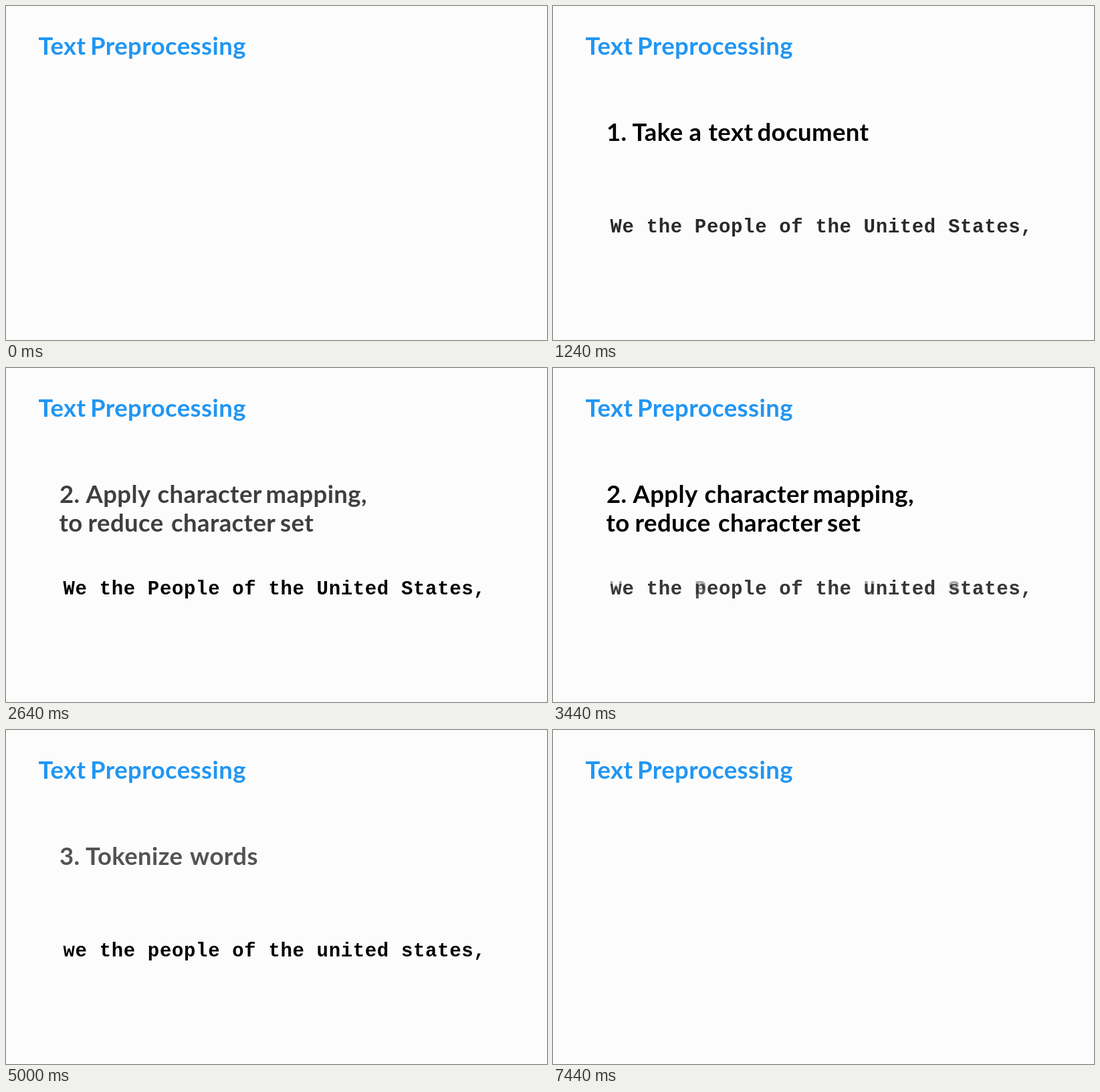
An HTML page for the animation above (7680 ms loop, 809x500 px).

```html
<!DOCTYPE html>
<html lang="en">
<head>
<meta charset="utf-8">
<title>Text Preprocessing</title>
<style>
  html, body { margin: 0; width: 100%; height: 100%; overflow: hidden; background: #fcfcfc; }
  svg { display: block; }
  text { white-space: pre; }
  .heading { font: 700 36.5px Lato, "Open Sans", sans-serif; letter-spacing: .4px; }
  .sample { font: 700 29px "Liberation Mono", "Courier New", monospace; letter-spacing: .65px; }
</style>
</head>
<body>
<svg id="stage" width="809" height="500" viewBox="0 0 809 500"></svg>
<script>
const LOOP = 7680;
const stage = document.getElementById("stage");

function add(parent, tag, attrs, content = "") {
  const node = document.createElementNS("http://www.w3.org/2000/svg", tag);
  for (const name in attrs) node.setAttribute(name, attrs[name]);
  node.textContent = content;
  return parent.appendChild(node);
}

// A line is [baseline, [x, word], [x, word], ...].
function heading(fill, ...lines) {
  const node = add(stage, "text", { class: "heading", fill });
  for (const [y, ...words] of lines)
    for (const [x, word] of words) add(node, "tspan", { x, y }, word);
  return node;
}

const sample = content =>
  add(stage, "text", { class: "sample", x: 85.5, y: 338.5 }, content);

heading("#2196f3", [73, [48.5, "Text"], [126, "Preprocessing"]]);

// Each layer fades in from `start` and out from `end`; `outStep` is the fade-out pace.
const layer = (node, start, end, outStep, outCount) => ({ node, start, end, outStep, outCount });

const layers = [
  layer(heading("#000", [202, [80, "1."], [118.5, "Take"], [203.5, "a"], [232.5, "text"], [305.5, "document"]]),
    160, 1520, 80, 9),
  layer(heading("#000",
    [202, [80, "2."], [119.5, "Apply"], [226.5, "character"], [388.5, "mapping,"]],
    [245, [79.5, "to"], [122.5, "reduce"], [247, "character"], [410, "set"]]),
    2320, 3920, 80, 9),
  layer(heading("#000", [202, [80, "3."], [119, "Tokenize"], [275, "words"]]),
    4720, 6320, 80, 9),
  layer(sample("We the People of the United States,"), 880, 3160, 40, 12),
  layer(sample("we the people of the united states,"), 3160, 5560, 40, 12),
  layer(sample("we the people of the united_states ,"), 5560, 7000, 40, 12)
];

// Linear progress in equal steps; the first step shows at `start`.
function stepped(t, start, step, count) {
  const k = Math.floor((t - start) / step) + 1;
  return Math.min(count, Math.max(0, k)) / count;
}

function render(t) {
  for (const { node, start, end, outStep, outCount } of layers) {
    const opacity = stepped(t, start, 40, 12) - stepped(t, end, outStep, outCount);
    node.setAttribute("opacity", Math.max(0, opacity));
  }
}

const origin = performance.now();
function tick() {
  render((performance.now() - origin) % LOOP);
  requestAnimationFrame(tick);
}
tick();
</script>
</body>
</html>
```
